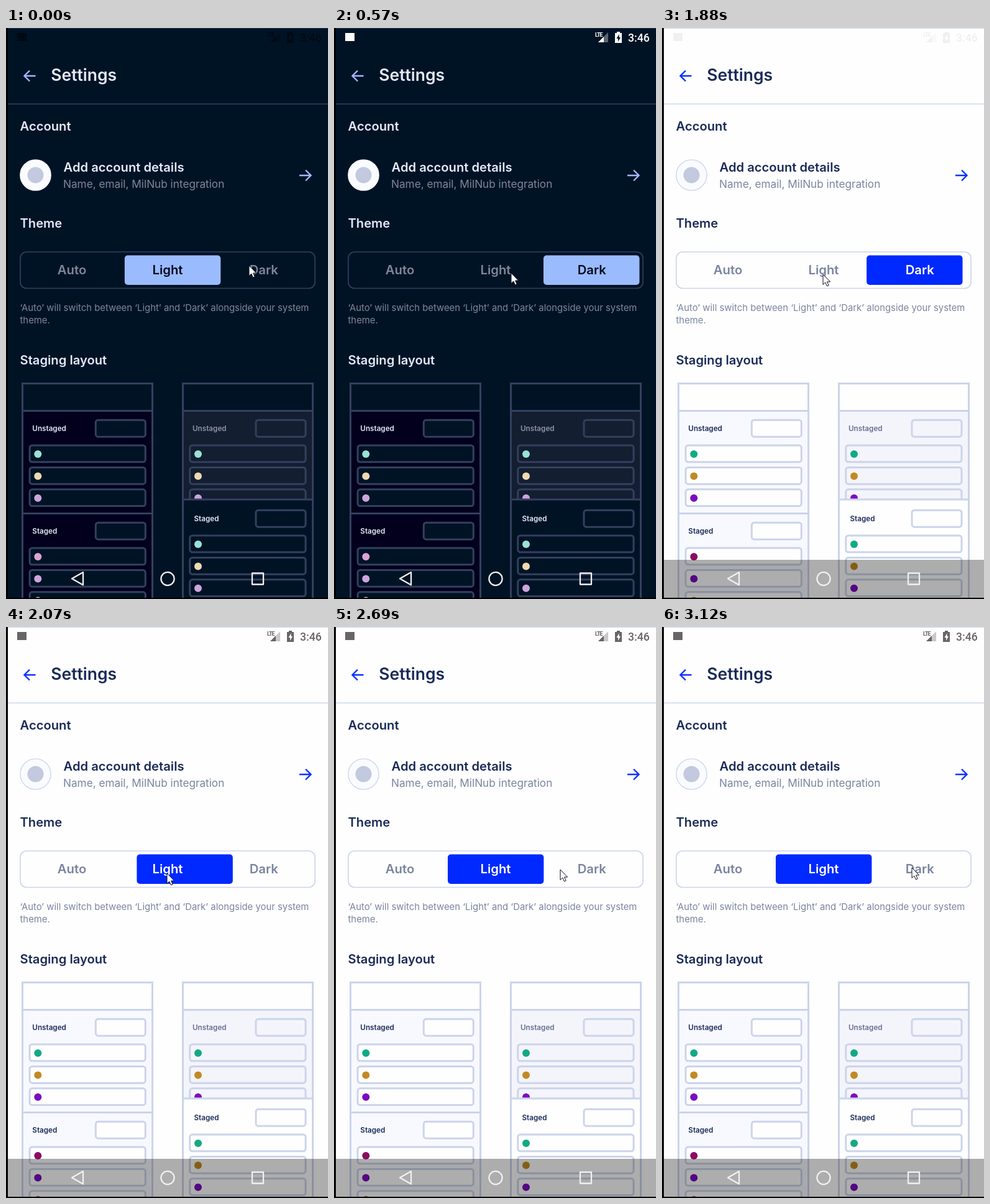
Recreate the animation shown at these times as an HTML page. Size 518x918 px, loop 3.63 s.

```html
<!DOCTYPE html>
<html lang="en">
<head>
<meta charset="utf-8">
<title>Settings theme switch</title>
<style>
html, body { margin: 0; width: 100%; height: 100%; overflow: hidden; background: #000; }
svg {
  display: block; width: 518px; height: 918px;
  font-family: Inter, Roboto, sans-serif;
  --bg: #001325; --ink: #e3e9fb; --muted: #7f8698; --accent: #a5b6fb;
  --pill: #9bbbff; --line: #353f5e; --rule: #3a4768; --edge: #1c2f52;
  --panel: #02001c; --dim: #131e31; --dimInk: #8f95a5; --ring: #fff;
  --teal: #99e2d6; --amber: #efd9b1; --plum: #cea4dd; --rose: #dca3d6;
  --nav: transparent;
}
svg.light {
  --bg: #fefefe; --ink: #1a2b58; --muted: #7a859f; --accent: #0a31ff;
  --pill: #0029ff; --line: #cbd4ea; --rule: #c8d3ea; --edge: #c9d6f1;
  --panel: #f8f9ff; --dim: #f4f4fb; --dimInk: #66718f; --ring: #ccd6ee;
  --teal: #12a985; --amber: #c28a22; --plum: #7a0bc0; --rose: #8b0a62;
  --nav: rgba(0, 0, 0, .32);
}
text { fill: var(--ink); white-space: pre; }
.title { font-size: 26.5px; font-weight: 600; }
.head { font-size: 20.2px; font-weight: 600; }
.sub { font-size: 17.2px; fill: var(--muted); }
.hint { font-size: 14.87px; fill: var(--muted); }
.tab { font-size: 20.3px; font-weight: 600; text-anchor: middle; fill: var(--muted); }
.small { font-size: 11.7px; font-weight: 600; }
.arrow { fill: none; stroke: var(--accent); stroke-width: 2.4; }
.box { stroke: var(--line); stroke-width: 3; }
.nav { fill: none; stroke: #f0f0f0; stroke-width: 2.3; stroke-linejoin: round; }
#status text { fill: inherit; font-family: Roboto, sans-serif; }
</style>
</head>
<body>
<svg id="stage" viewBox="0 0 518 918">
  <rect width="518" height="918" fill="#000"/>
  <rect x="3" width="515" height="916" fill="var(--bg)"/>
  <rect x="3" width="515" height="1" fill="var(--edge)"/>

  <g id="status">
    <rect x="18" y="8" width="15" height="13"/>
    <path d="M441 7V23H425Z" opacity=".35"/>
    <path d="M434 14V23H425Z"/>
    <text x="420" y="13.5" font-size="9" font-weight="700" letter-spacing="-1">LTE</text>
    <path fill-rule="evenodd" d="M455 8V6H460V8H463V24H452V8ZM458.6 10L454.5 17H457V22L461 15H458.6Z"/>
    <text x="473" y="21.5" font-size="17.6" font-weight="500">3:46</text>
  </g>

  <path class="arrow" d="M47.5 77H29.5M38 68.5L29.5 77L38 85.5"/>
  <text class="title" x="72.3" y="85">Settings</text>
  <rect x="3" y="121.5" width="515" height="1.3" fill="var(--rule)"/>

  <text class="head" x="22.5" y="165">Account</text>
  <circle cx="47.5" cy="236.5" r="24.6" fill="#fafbff" stroke="var(--ring)" stroke-width="1.4"/>
  <circle cx="47.5" cy="236.5" r="13" fill="#c3c9de"/>
  <text class="head" x="92.5" y="230.5">Add account details</text>
  <text class="sub" x="92" y="257">Name, email, MilNub integration</text>
  <path class="arrow" d="M472 237H490.5M482 228.5L490.5 237L482 245.5"/>

  <text class="head" x="22.5" y="321">Theme</text>
  <rect x="23" y="360" width="474" height="58.5" rx="10" fill="none" stroke="var(--line)" stroke-width="1.6"/>
  <rect id="pill" y="365.5" width="154.4" height="47.5" rx="5" fill="var(--pill)"/>
  <text class="tab" x="106" y="395.5">Auto</text>
  <text class="tab" id="lightTab" x="260" y="395.5">Light</text>
  <text class="tab" id="darkTab" x="414.8" y="395.5">Dark</text>
  <text class="hint" x="22.5" y="455">‘Auto’ will switch between ‘Light’ and ‘Dark’ alongside your system</text>
  <text class="hint" x="22.5" y="474.5">theme.</text>

  <text class="head" x="22.5" y="541">Staging layout</text>
  <clipPath id="screen"><rect x="3" width="515" height="916"/></clipPath>
  <g id="cards" clip-path="url(#screen)"></g>

  <rect x="3" y="855" width="515" height="61" fill="var(--nav)"/>
  <path class="nav" d="M106 885.3L124 875V895.6Z"/>
  <circle class="nav" cx="260" cy="885.5" r="10.6"/>
  <rect class="nav" x="396" y="876.5" width="18" height="18"/>

  <path id="cursor" d="M0 0V16.5L3.8 13L6.4 19L9.2 17.8L6.6 12H11.6Z" fill="#fff" stroke="#0a1020" stroke-width="1"/>
</svg>
<script>
const LOOP = 3630, TO_LIGHT = 1880, STEP = 47;
const $ = id => document.getElementById(id);

// Staging layout previews
const box = (x, y, w, h, fill, r = 0) =>
  `<rect class="box" x="${x}" y="${y}" width="${w}" height="${h}" rx="${r}" fill="var(--${fill})"/>`;

function section(x, y, label, dots, fill, ink = "ink", inset = 17) {
  let out = `<text class="small" x="${x + inset}" y="${y + 17.5}" style="fill:var(--${ink})">${label}</text>`
    + box(x + 119, y + .2, 80, 27, fill, 4);
  dots.forEach((dot, i) => {
    const top = y + 41 + i * 35.4;
    out += box(x + 12.8, top, 186.2, 26.8, fill, 4)
      + `<circle cx="${x + 26}" cy="${top + 14}" r="6" fill="var(--${dot})"/>`;
  });
  return out;
}

const first = ["teal", "amber", "plum"];
const card = (x, body) => box(x + 1.5, 571.5, 209, 400, body) + box(x + 1.5, 571.5, 209, 44, "bg");
$("cards").innerHTML =
  card(25, "panel")
  + section(25.3, 630, "Unstaged", first, "bg")
  + box(26.5, 780.5, 209, 200, "panel")
  + section(25.3, 795, "Staged", ["rose", "plum", "amber"], "bg")
  + card(283, "dim")
  + section(283, 630, "Unstaged", first, "dim", "dimInk")
  + box(284.5, 758, 209, 200, "bg")
  + section(283, 775, "Staged", first, "bg", "ink", 19.5);

// Pointer path: time, x, y
const path = [
  [0, 391, 382], [190, 387, 383], [400, 330, 390], [570, 283, 394],
  [860, 260, 395], [1080, 259, 396], [2100, 259, 396], [2360, 287, 395],
  [2690, 367, 390], [2930, 389, 388], [3120, 403, 387], [LOOP, 403, 387]
];

const clamp = v => Math.min(1, Math.max(0, v));
const mix = (a, b, p) => a + (b - a) * p;
const mixRgb = (a, b, p) => `rgb(${a.map((v, i) => Math.round(mix(v, b[i], p)))})`;

// cubic-bezier(.25, .1, .25, 1)
function ease(x) {
  const curve = (a, b, u) => 3 * a * u * (1 - u) ** 2 + 3 * b * u * u * (1 - u) + u ** 3;
  let lo = 0, hi = 1;
  for (let i = 0; i < 20; i++) {
    const mid = (lo + hi) / 2;
    if (curve(.25, .25, mid) < x) lo = mid; else hi = mid;
  }
  return curve(.1, 1, lo);
}

function pointer(t) {
  const i = Math.max(1, path.findIndex(k => k[0] > t));
  const [a, b] = [path[i - 1], path[i]];
  const p = (t - a[0]) / (b[0] - a[0]);
  return [mix(a[1], b[1], p), mix(a[2], b[2], p)];
}

function draw(time) {
  const t = Math.floor(time / STEP) * STEP;
  const light = t >= TO_LIGHT;
  const since = light ? t - TO_LIGHT : t;
  const p = ease(clamp((since + 28) / 415));
  const [from, to] = light ? [337, 183] : [183, 337];

  $("stage").classList.toggle("light", light);
  $("pill").setAttribute("x", mix(from, to, p).toFixed(2));

  const on = light ? [255, 255, 255] : [0, 12, 28];
  const off = light ? [122, 133, 159] : [127, 134, 152];
  const swap = clamp((p - .1) / .65);
  $("lightTab").style.fill = mixRgb(off, on, light ? swap : 1 - swap);
  $("darkTab").style.fill = mixRgb(off, on, light ? 1 - swap : swap);

  const fade = clamp(since / 130);
  $("status").style.fill = light
    ? mixRgb([240, 240, 240], [102, 102, 102], fade)
    : mixRgb([0, 10, 20], [255, 255, 255], fade);

  $("cursor").setAttribute("transform", `translate(${pointer(t).map(Math.round)})`);
}

const start = performance.now();
function tick() {
  draw((performance.now() - start) % LOOP);
  requestAnimationFrame(tick);
}
tick();
</script>
</body>
</html>
```
